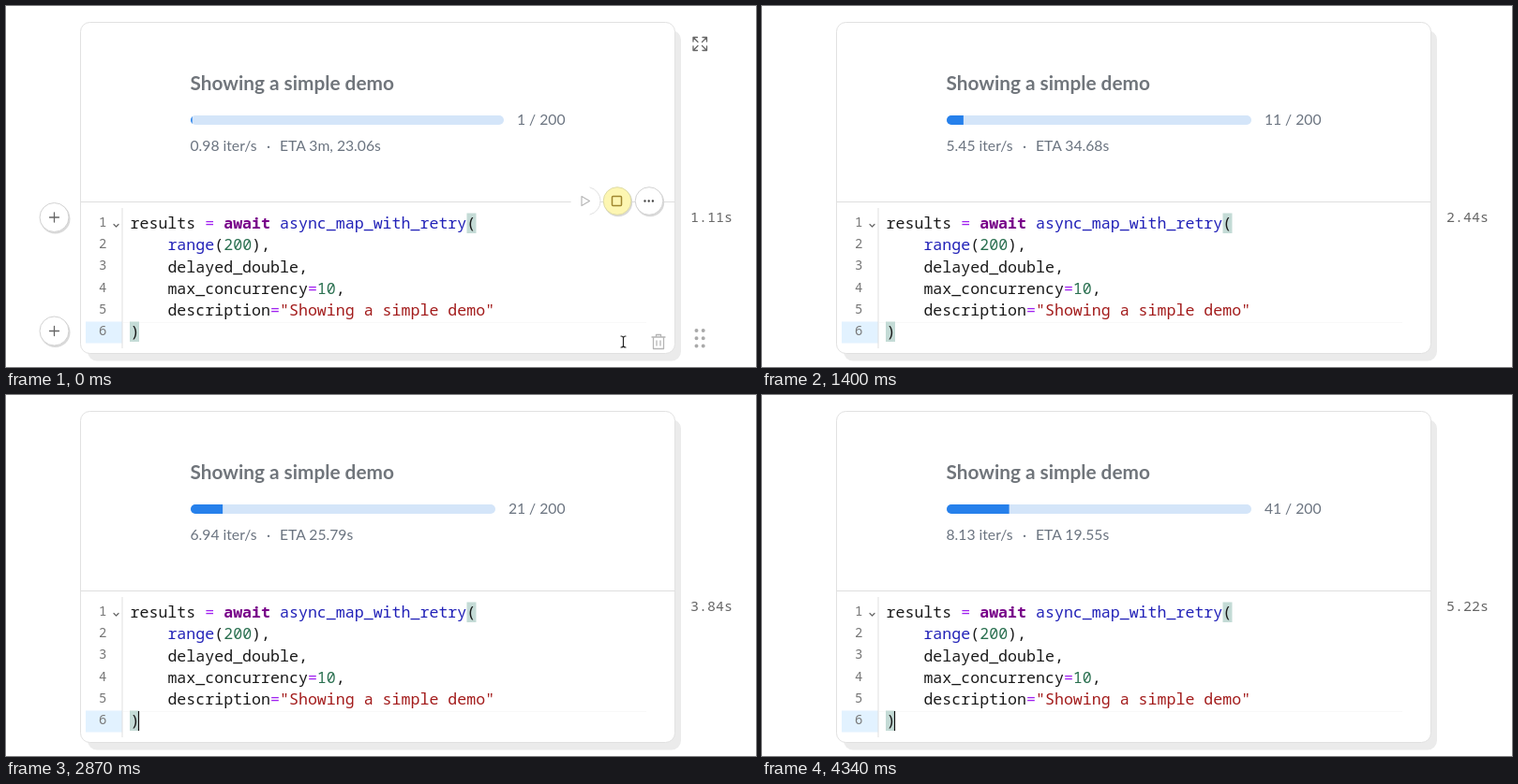
An HTML page that plays this animation: 800x386 px, repeating every 4410 ms.

```html
<!DOCTYPE html>
<html lang="en">
<head>
<meta charset="utf-8">
<title>Async progress</title>
<style>
  html, body { margin: 0; width: 100%; height: 100%; overflow: hidden; background: #fff; }
  svg { display: block; }
  text { white-space: pre; }
  .label { font: 15.7px Lato, "Open Sans", sans-serif; fill: #6b7480; }
  .title { font: bold 20.8px Lato, "Open Sans", sans-serif; fill: #70757b; }
  .code { font: 16.62px "Noto Sans Mono", "DejaVu Sans Mono", monospace; fill: #1a1a1a; }
  .nums { font: 14px "Noto Sans Mono", "DejaVu Sans Mono", monospace; fill: #777; text-anchor: end; }
  .timer { font: 15px "Noto Sans Mono", "DejaVu Sans Mono", monospace; fill: #666; }
  .op { fill: #a020f0; }
  .kw { fill: #770088; font-weight: 600; }
  .fn { fill: #2222b8; }
  .num { fill: #2a7050; }
  .str { fill: #a31c1c; }
  .match { fill: #c4dbd6; }
  .line { fill: none; stroke-linecap: round; stroke-linejoin: round; }
  .btn { fill: #fff; stroke: #d2d2d2; }
  .shade { fill: #d9d9d9; }
</style>
</head>
<body>
<svg width="800" height="386" viewBox="0 0 800 386">
  <defs>
    <clipPath id="barClip"><rect id="barShape" x="197" y="117" height="10" rx="5"/></clipPath>
    <g id="plus">
      <circle class="shade" cx="1" cy="1.5" r="16"/>
      <circle class="btn" r="15.5"/>
      <path class="line" stroke="#666" stroke-width="1.3" d="M-5 0H5M0-5V5"/>
    </g>
  </defs>

  <rect x="87" y="26" width="633" height="353.5" rx="10" fill="#ebebeb"/>
  <rect x="79.5" y="17.5" width="634" height="354" rx="10" fill="#fff" stroke="#e1e1e1"/>
  <path d="M80 209.5H713" stroke="#dedede"/>

  <text class="title" x="196.5" y="90">Showing a simple demo</text>
  <g clip-path="url(#barClip)">
    <rect x="197" y="117" width="340" height="10" fill="#d4e5f9"/>
    <rect id="fill" x="197" y="117" height="10" fill="#2680eb"/>
  </g>
  <text class="label" id="count" x="596.5" y="127" text-anchor="end"></text>
  <text class="label" id="rate" x="196.5" y="155"></text>
  <text class="label" x="278" y="155">·</text>
  <text class="label" id="eta" y="155"></text>

  <rect x="85" y="337.5" width="39" height="23" fill="#e2f2ff"/>
  <path d="M124 216V366" stroke="#dfdfdf"/>
  <path d="M125 338.5H683" stroke="#f9f9f9"/>
  <g class="nums" id="nums"></g>
  <path class="line" stroke="#666" stroke-width="1.2" d="M115 233.5L117.5 236L120 233.5"/>
  <rect class="match" x="491.5" y="221.5" width="10" height="21.5"/>
  <rect class="match" x="132" y="337.5" width="10" height="21.5"/>
  <g class="code">
    <text x="132.5" y="238">results <tspan class="op">=</tspan> <tspan class="kw">await</tspan> <tspan class="fn">async_map_with_retry</tspan>(</text>
    <text x="172.4" y="261">    </text>
    <text x="172.4" y="261"><tspan class="fn">range</tspan>(<tspan class="num">200</tspan>),</text>
    <text x="172.4" y="284.5">delayed_double,</text>
    <text x="172.4" y="307.5">max_concurrency<tspan class="op">=</tspan><tspan class="num">10</tspan>,</text>
    <text x="172.4" y="330.5">description<tspan class="op">=</tspan><tspan class="str">"Showing a simple demo"</tspan></text>
    <text x="132.5" y="353.5">)</text>
  </g>
  <path id="caret" d="M141.5 338V359" stroke="#111" stroke-width="1.2"/>
  <text class="timer" id="timer" x="730" y="231"></text>

  <g id="controls">
    <use href="#plus" x="51.5" y="226"/>
    <use href="#plus" x="51.5" y="347.5"/>
    <path class="line" stroke="#666" stroke-width="1.3" d="M733 38V33.5H737.5M733 33.5L738 38.5M743 33.5H747.5V38M747.5 33.5L742.5 38.5M733 43V47.5H737.5M733 47.5L738 42.5M743 47.5H747.5V43M747.5 47.5L742.5 42.5"/>
    <circle cx="618" cy="208.5" r="15.5" fill="#fff"/>
    <path class="line" stroke="#e1e1e1" d="M623 223A15 15 0 0 0 623 194"/>
    <path class="line" stroke="#b8b8b8" stroke-width="1.2" d="M614 203.5L622.5 208.5L614 213.5Z"/>
    <circle class="shade" cx="653" cy="210" r="15.2"/>
    <circle cx="652" cy="208.5" r="14.8" fill="#fdf6b2" stroke="#dedba6"/>
    <rect class="line" stroke="#a0872f" stroke-width="1.5" x="646.5" y="203.5" width="10" height="10" rx="1"/>
    <circle class="shade" cx="687" cy="210" r="15.2"/>
    <circle class="btn" cx="686" cy="208.5" r="14.8"/>
    <path class="line" stroke="#444" stroke-width="2.4" stroke-dasharray="0 4.2" d="M681.5 208.5H690.5"/>
    <path class="line" stroke="#b5b5b5" stroke-width="1.3" d="M689 354H703M693.5 354V351.5H698.5V354M690.5 354V366.5H701.5V354M694 358V363M698 358V363"/>
    <path class="line" stroke="#aaa" stroke-width="4" stroke-dasharray="0 8.2" d="M736.5 347V364M743.7 347V364"/>
  </g>
  <path id="pointer" class="line" stroke="#222" stroke-width="1.2" d="M656 353Q658.5 353 658.5 355Q658.5 353 661 353M658.5 355V363M656 365Q658.5 365 658.5 363Q658.5 365 661 365"/>
</svg>
<script>
const LOOP = 4410, STEP = 70;
const el = id => document.getElementById(id);

// done, rate, remaining time, x of the remaining time
const stages = [
  [1, "0.98", "3m, 23.06s", 292],
  [11, "5.45", "34.68s", 292],
  [21, "6.94", "25.79s", 292],
  [31, "7.68", "22.01s", 290],
  [41, "8.13", "19.55s", 292]
];
const clock = [[0, 1.11], [840, 1.91], [1400, 2.44], [2520, 3.51], [3220, 4.17], [3920, 4.83], [4340, 5.22]];

el("nums").innerHTML = [1, 2, 3, 4, 5, 6]
  .map(n => `<text x="107.5" y="${212.8 + n * 23.2}">${n}</text>`).join("");

function elapsed(t) {
  const i = clock.findIndex(([at]) => at >= t);
  if (i < 1) return clock[0][1];
  const [t0, v0] = clock[i - 1], [t1, v1] = clock[i];
  return v0 + (v1 - v0) * (t - t0) / (t1 - t0);
}

function show(id, on) {
  el(id).style.visibility = on ? "visible" : "hidden";
}

function draw(t) {
  const [done, rate, eta, etaX] = stages[Math.floor(t / 1050)];
  const width = done < 10 ? 334 : 325;
  el("barShape").setAttribute("width", width);
  el("fill").setAttribute("width", width * done / 200);
  el("count").textContent = `${done} / 200`;
  el("rate").textContent = `${rate} iter/s`;
  el("eta").textContent = `ETA ${eta}`;
  el("eta").setAttribute("x", etaX);
  el("timer").textContent = elapsed(t).toFixed(2) + "s";

  // The caret is lit for the first half of each blink
  show("caret", (t + 1096) % 1266 < 633);
  show("controls", t < 210);
  show("pointer", t < 280);
  el("pointer").setAttribute("transform", `translate(0 ${Math.max(0, t - 35) / 7})`);
}

function tick(now) {
  draw(Math.floor(now % LOOP / STEP) * STEP);
  requestAnimationFrame(tick);
}
draw(0);
requestAnimationFrame(tick);
</script>
</body>
</html>
```
